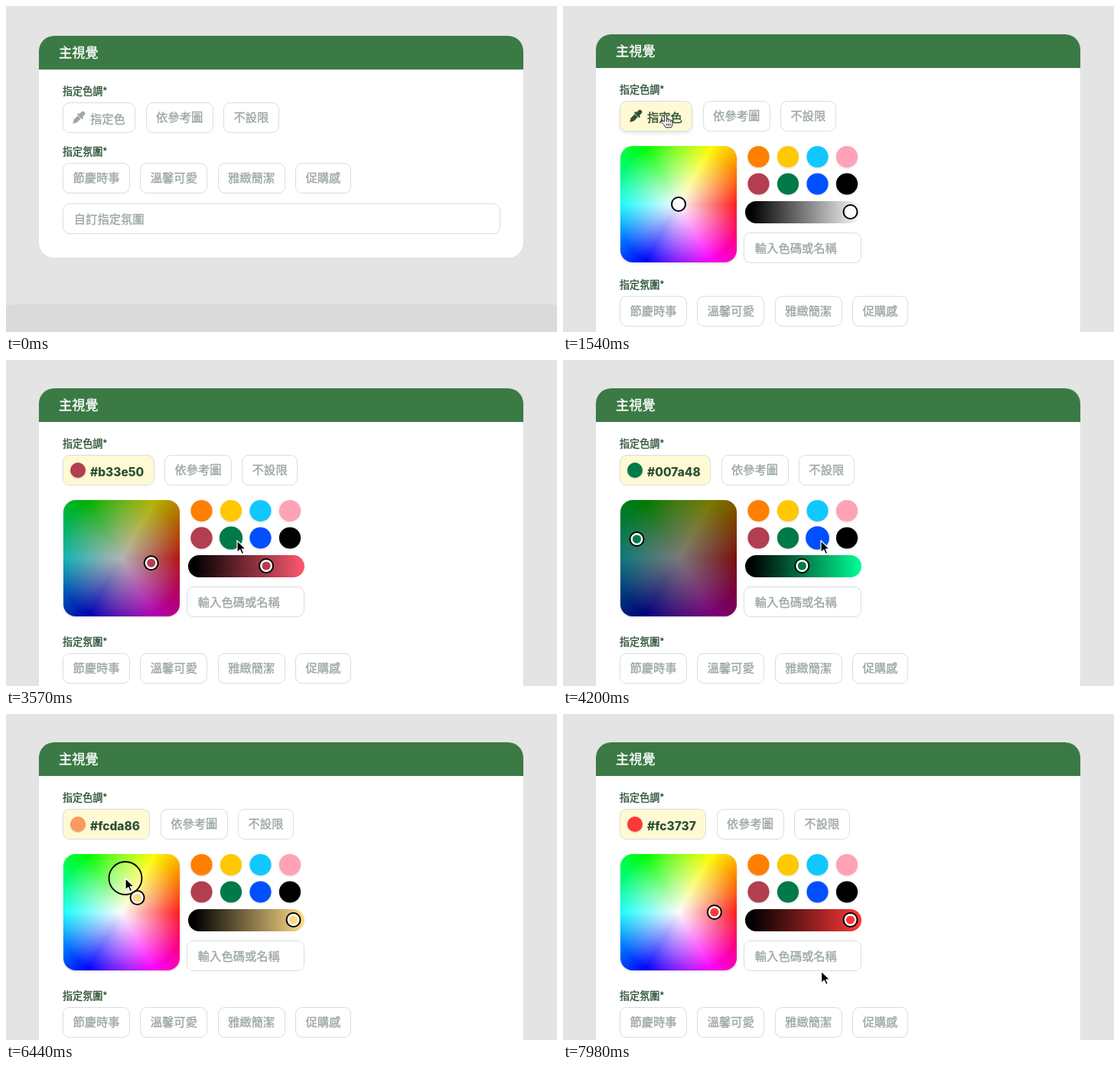
An HTML page that plays this animation: 720 px wide and 426 px high, repeating every 8 s.

```html
<!DOCTYPE html>
<html lang="zh-Hant">
<head>
<meta charset="utf-8">
<style>
  html, body { margin: 0; width: 100%; height: 100%; overflow: hidden; }
  body { position: relative; background: #e4e4e4; color: #9ca89f; -webkit-text-stroke: .35px;
    font: 400 15.3px/38px "Noto Sans CJK TC", "Noto Sans CJK JP", sans-serif; white-space: nowrap; }
  div, svg { position: absolute; box-sizing: border-box; }
  #page, #mood { inset: 0; }
  #bar { left: -12px; width: 744px; height: 60px; border-radius: 20px; background: #dadada; }
  #card { left: 43px; top: 39px; width: 633px; border-radius: 20px; background: #fff;
    overflow: hidden; box-shadow: 0 0 3px #0000000d; }
  #head { width: 100%; height: 44px; padding-left: 26px; background: #3b7a45; color: #fff;
    font-size: 17.2px; line-height: 42px; }
  .label { left: 74px; color: #2b5135; font-size: 13.1px; line-height: 20px; }
  .row { left: 74px; display: flex; gap: 13.4px; }
  .row > div { position: relative; }
  .box { height: 40px; padding: 0 12.4px; border: 1px solid #d9dedb; border-radius: 9px; background: #fff; }
  .box span { position: relative; top: -2px; }
  .field span { top: -1px; left: 1.4px; }
  #pick { padding-left: 35px; }
  #pick span { top: 0; }
  #pick span.hex { top: .5px; font: 800 15.5px/38px Inter, sans-serif; -webkit-text-stroke: 0; }
  #drop { left: 11px; top: 10px; }
  #dot { left: 9px; top: 9px; width: 20px; height: 20px; border-radius: 50%; box-shadow: 0 1px 2px #0003; }
  #map { left: 75px; top: 183px; width: 152px; height: 152px; border-radius: 16px; overflow: hidden;
    box-shadow: 0 1px 3px #0003;
    background: radial-gradient(circle, #fff, #fff0 85px),
      conic-gradient(from 90deg, red, #f0f, blue, cyan, lime, yellow, red); }
  #shade { inset: 0; background: #000; }
  #slider { left: 238px; top: 255px; width: 152px; height: 29px; border-radius: 15px; }
  #over { left: 0; top: 0; }
</style>
</head>
<body>
<div id="page">
  <div id="bar"></div>
  <div id="card"><div id="head">主視覺</div></div>
  <div class="label" style="top:101px">指定色調*</div>
  <div class="row" style="top:126px">
    <div class="box" id="pick">
      <svg id="drop" width="18" height="18" fill="currentColor">
        <g transform="translate(9 9) rotate(45)">
          <rect x="-2.8" y="-10.5" width="5.6" height="8" rx="2.8"/>
          <rect x="-4.8" y="-4.2" width="9.6" height="2.6" rx="1.2"/>
          <path d="M-2.8 -1H2.8V6L0 11L-2.8 6Z"/>
        </g>
      </svg>
      <div id="dot"></div><span id="name"></span>
    </div>
    <div class="box"><span>依參考圖</span></div>
    <div class="box"><span>不設限</span></div>
  </div>
  <div id="mood">
    <div class="label" style="top:180px">指定氛圍*</div>
    <div class="row" style="top:205px">
      <div class="box"><span>節慶時事</span></div>
      <div class="box"><span>溫馨可愛</span></div>
      <div class="box"><span>雅緻簡潔</span></div>
      <div class="box"><span>促購感</span></div>
    </div>
    <div class="box field" style="left:74px;top:258px;width:572px"><span>自訂指定氛圍</span></div>
  </div>
</div>
<div id="picker">
  <div id="map"><div id="shade"></div></div>
  <div id="slider"></div>
  <div class="box field" style="left:236px;top:296px;width:154px"><span>輸入色碼或名稱</span></div>
</div>
<svg id="over" width="720" height="426">
  <defs>
    <g id="ring"><circle r="10" fill="#000"/><circle r="8" fill="#fff"/><circle r="5.6" fill="currentColor"/></g>
  </defs>
  <g id="tools">
    <g id="swatches" style="filter:drop-shadow(0 1px 1px #0002)"></g>
    <use href="#ring" id="mapRing"/>
    <use href="#ring" id="valueRing"/>
  </g>
  <circle id="halo" fill="#ffffff26" stroke="#000" stroke-width="1.8"/>
  <g id="cursor" stroke-linejoin="round">
    <path id="arrow" d="M0 0V15.5L3.7 12.1L6.2 17.6L8.8 16.4L6.3 11H11.2Z" stroke="#fff" stroke-width="1.2"/>
    <path id="hand" d="M-1.6 9V1.4Q-1.4 0 0 0T1.6 1.4V6Q3 5 4.2 6.4Q5.8 5.6 6.7 7.2Q8.8 6.8 9 9V12Q8.6 14.5 7.4 16.8H.2Q-1.5 13.5 -4.6 10.6Q-5.6 9 -4.4 8.2Q-3.2 7.7 -1.6 9ZM1.6 6V9.5M4.2 7V9.7M6.7 7.5V10M1.6 11.5V14.5M3.8 11.5V14.5M6 11.5V14.5"
      fill="#fff" stroke="#222"/>
  </g>
</svg>
<script>
const $ = id => document.getElementById(id);
const LOOP = 8000, STEP = 70, OPEN = 1540, PRESS = 5800, RELEASE = 7420, LAG = 135;
const CX = 151, CY = 259, RADIUS = 60, FULL = 252 / 255;
const WHITE = [252, 252, 252], PALE = [255, 250, 212], GREY = [156, 168, 159], DARK = [43, 81, 53];

// Cursor tip: time, x, y
const path = [
  [70, 336, 352], [350, 300, 320], [1120, 134, 142], [1820, 134, 142],
  [2500, 257, 235], [3300, 257, 235], [3570, 302, 236], [3900, 302, 236],
  [4180, 337, 236], [4340, 337, 236], [4600, 375, 236], [4900, 375, 236],
  [5220, 298, 226], [5320, 272, 204], [5740, 186, 244], [6160, 186, 244],
  [6305, 171.6, 240], [6440, 156, 214.5], [6650, 117, 237], [6865, 123.2, 279.1],
  [7000, 145, 280], [7210, 197.9, 259], [7490, 197.9, 259], [7980, 337.5, 336]
];
const colors = ["#ff8000", "#ffc800", "#10c8ff", "#ffa2b8", "#b33e50", "#007a48", "#0050ff", "#000000"];
const spots = colors.map((c, i) => [255.5 + i % 4 * 38.5, i < 4 ? 197 : 232.5]);
const clicks = [[2750, 4], [3750, 5], [4250, 6], [4700, 7]];

const clamp = x => Math.max(0, Math.min(1, x));
const ease = x => (x = clamp(x), x * x * (3 - 2 * x));
const mix = (a, b, k) => a.map((v, i) => v + (b[i] - v) * k);
const rgb = c => `rgb(${c.map(Math.round)})`;
const toHex = c => "#" + c.map(v => Math.round(v).toString(16).padStart(2, "0")).join("");
const fromHex = h => [1, 3, 5].map(i => parseInt(h.slice(i, i + 2), 16));
const move = (id, x, y) => $(id).setAttribute("transform", `translate(${x} ${y})`);

function cursorAt(t) {
  const n = path.length - 1;
  t = Math.max(path[0][0], Math.min(path[n][0], t));
  const i = Math.min(n - 1, path.findLastIndex(p => p[0] <= t));
  const same = (a, b) => a[1] === b[1] && a[2] === b[2];
  const slope = (k, axis) => {
    const a = path[k - 1], b = path[k], c = path[k + 1];
    return !a || !c || same(a, b) || same(b, c) ? 0 : (c[axis] - a[axis]) / (c[0] - a[0]);
  };
  const [a, b] = [path[i], path[i + 1]], d = b[0] - a[0], u = (t - a[0]) / d;
  return [1, 2].map(k => a[k] + (b[k] - a[k]) * u * u * (3 - 2 * u)
    + d * u * (1 - u) * ((1 - u) * slope(i, k) - u * slope(i + 1, k)));
}

// Share of the last 180 ms that the cursor spent inside an area
function hover(t, inside) {
  let sum = 0;
  for (let k = 0; k < 10; k++) sum += inside(...cursorAt(t - k * 20));
  return sum / 10;
}
const onButton = (x, y) => x > 74 && x < 170 && y > 124 && y < 166;

// A wheel point is [x, y, value]: hue is the angle, saturation the distance
function wheelColor([x, y, v]) {
  const h = Math.atan2(CY - y, x - CX) / Math.PI * 3 + 6;
  const s = Math.min(1, Math.hypot(x - CX, y - CY) / RADIUS);
  return [5, 3, 1].map(n => {
    const k = (n + h) % 6;
    return 255 * v * (1 - s * clamp(Math.min(k, 4 - k)));
  });
}
function wheelPoint([r, g, b]) {
  const max = Math.max(r, g, b), d = max - Math.min(r, g, b);
  if (!d) return [CX, CY, max / 255];
  const h = max === r ? (g - b) / d : max === g ? 2 + (b - r) / d : 4 + (r - g) / d;
  const angle = h * Math.PI / 3, dist = RADIUS * d / max;
  return [CX + dist * Math.cos(angle), CY - dist * Math.sin(angle), max / 255];
}

function pickedAt(t) {
  let point = wheelPoint(WHITE), dot = WHITE, hex = "";
  for (const [at, i] of clicks) {
    if (t < at) break;
    const c = fromHex(colors[i]), k = ease((t - at) / 250);
    point = mix(point, wheelPoint(c), k);
    dot = mix(dot, c, k);
    hex = colors[i];
  }
  if (t >= PRESS) {
    const k = ease((t - PRESS) / 250);
    point = mix(point, [...cursorAt(Math.min(t - LAG, RELEASE)), FULL], k);
    dot = mix(dot, wheelColor([186, 244, FULL]), k);
    dot = mix(dot, wheelColor([197.9, 259, FULL]), ease((t - RELEASE) / 250));
    hex = toHex(wheelColor(point));
  }
  return { point, dot, hex };
}

$("swatches").innerHTML = colors.map((c, i) =>
  `<circle cx="${spots[i][0]}" cy="${spots[i][1]}" fill="${c}"/>`).join("");

function draw(t) {
  const open = t < OPEN ? 0 : t < OPEN + STEP ? .977 : 1;
  const [x, y] = cursorAt(t), { point, dot, hex } = pickedAt(t);

  $("page").style.transform = `translateY(${-2 * ease((t - 70) / 500)}px)`;
  $("mood").style.transform = `translateY(${180 * open}px)`;
  $("card").style.height = 290 + 180 * open + "px";
  $("bar").style.top = 390 + 180 * open + "px";
  $("picker").style.display = $("tools").style.display = open ? "" : "none";

  const warm = hover(t, onButton), on = open ? 1 : warm, pick = $("pick").style;
  pick.background = rgb(mix([255, 255, 255], PALE, on));
  pick.color = rgb(mix(GREY, DARK, on));
  pick.boxShadow = `0 3px 4px rgba(0,0,0,${.08 * warm})`;
  $("name").textContent = hex || "指定色";
  $("name").className = hex ? "hex" : "";
  $("drop").style.display = hex ? "none" : "";
  $("dot").style.display = hex ? "" : "none";
  $("dot").style.background = rgb(dot);

  const color = rgb(wheelColor(point)), v = point[2];
  $("shade").style.opacity = 1 - v;
  $("slider").style.background = `linear-gradient(90deg, #000 5%, ${rgb(wheelColor([point[0], point[1], 1]))})`;
  $("mapRing").style.color = $("valueRing").style.color = color;
  move("mapRing", point[0], point[1]);
  move("valueRing", 253 + 124 * v, 269);
  [...$("swatches").children].forEach((c, i) => {
    const near = hover(t, (px, py) => Math.hypot(px - spots[i][0], py - spots[i][1]) < 15);
    c.setAttribute("r", 14.1 + 1.4 * near);
  });

  const held = ease((t - PRESS) / 200) * (1 - ease((t - RELEASE + 100) / 200));
  $("halo").setAttribute("r", 21.5 * held);
  $("halo").style.opacity = held;
  move("halo", x, y);
  move("cursor", x, y);
  $("cursor").style.opacity = clamp((t - 70) / 280);
  const hand = onButton(x, y);
  $("hand").style.display = hand ? "" : "none";
  $("arrow").style.display = hand ? "none" : "";
}

const start = performance.now();
function tick() {
  const t = (performance.now() - start) % LOOP;
  draw(Math.floor(t / STEP) * STEP);
  requestAnimationFrame(tick);
}
tick();
</script>
</body>
</html>
```
